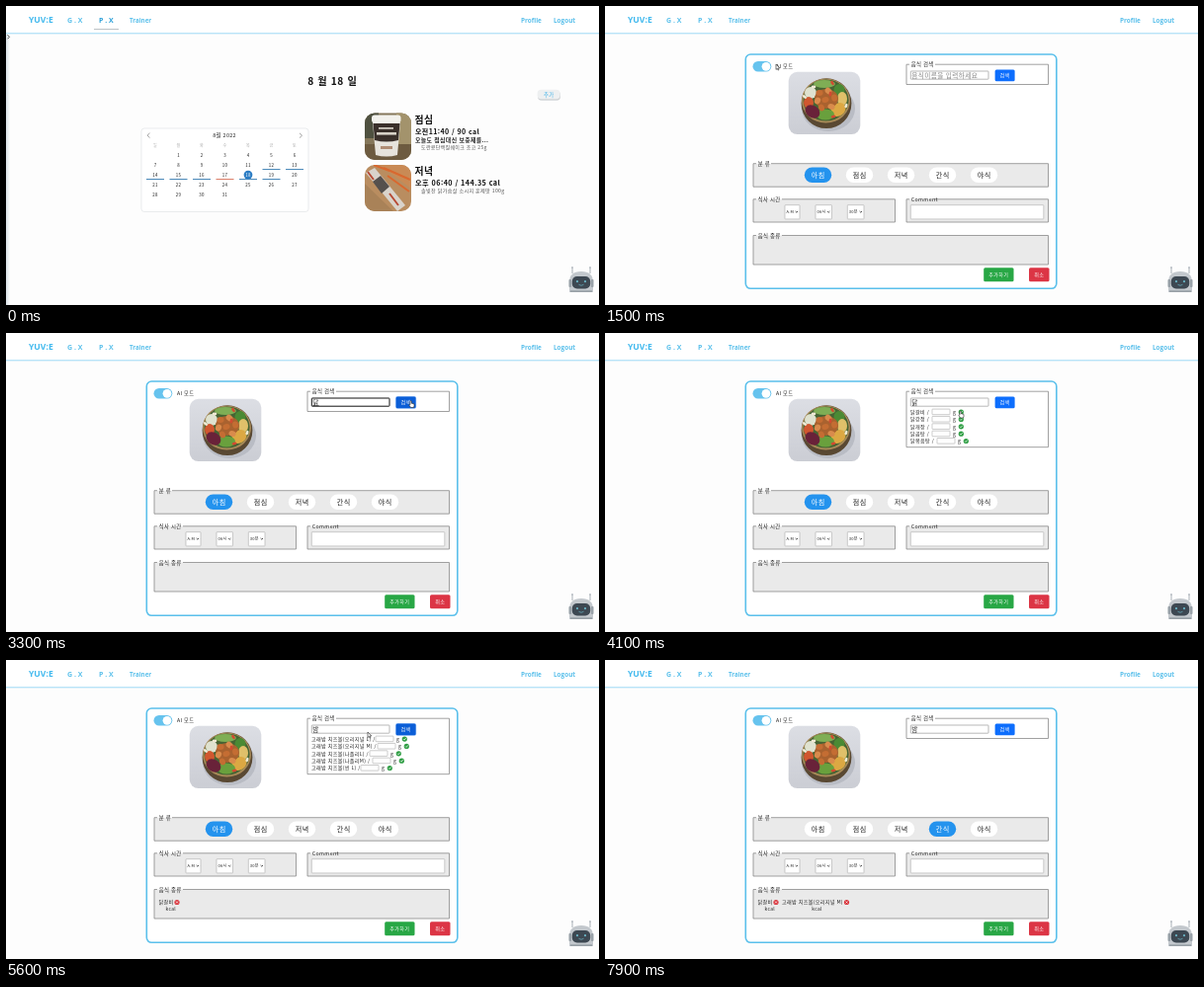
These frames come from a looping animation (600 px wide and 303 px high, 8000 ms). An HTML page:

```html
<!DOCTYPE html>
<html lang="ko">
<head>
<meta charset="utf-8">
<style>
html, body { margin: 0; height: 100%; overflow: hidden; background: #fdfdfd; }
svg { display: block; width: 100vw; height: 100vh; }
text { font-family: "Noto Sans CJK KR", "Noto Sans CJK JP", "Noto Sans CJK", sans-serif; letter-spacing: .06em; white-space: pre; }
.nav { font-family: "Open Sans", sans-serif; font-weight: 700; letter-spacing: 0; }
</style>
</head>
<body>
<svg id="stage" viewBox="0 0 600 303"></svg>
<script>
const LOOP = 8000, STEP = 100;
const SKY = '#5bc0eb', INK = '#222';

const text = (x, y, size, s, fill = INK, extra = '') =>
  `<text x="${x}" y="${y}" font-size="${size}" fill="${fill}" ${extra}>${s}</text>`;
const mid = (x, y, size, s, fill, extra = '') => text(x, y, size, s, fill, `text-anchor="middle" ${extra}`);
const rect = (x, y, w, h, fill, r = 0, extra = '') =>
  `<rect x="${x}" y="${y}" width="${w}" height="${h}" rx="${r}" fill="${fill}" ${extra}/>`;
const circle = (x, y, r, fill) => `<circle cx="${x}" cy="${y}" r="${r}" fill="${fill}"/>`;
const oval = (x, y, rx, ry, fill, turn = 0) =>
  `<ellipse cx="${x}" cy="${y}" rx="${rx}" ry="${ry}" fill="${fill}" transform="rotate(${turn} ${x} ${y})"/>`;
const line = (d, stroke, width = 0.7, extra = '') =>
  `<path d="${d}" fill="none" stroke="${stroke}" stroke-width="${width}" ${extra}/>`;
const border = (color, width = 0.6) => `stroke="${color}" stroke-width="${width}"`;
const BOLD = 'font-weight="700"', MEDIUM = 'font-weight="500"';

// Fieldset whose top border is broken by its legend
const fieldset = (x, y, r, b, legend, gap, fill) =>
  `<path d="M${x + 4 + gap} ${y}H${r}V${b}H${x}V${y}H${x + 3}" fill="${fill}" ${border('#8a8a8a', 0.8)}/>` +
  text(x + 4.7, y + 2, 5.4, legend);

const button = (x, y, w, h, label, fill) =>
  rect(x, y, w, h, fill, 1.5) + mid(x + w / 2, y + h / 2 + 1.9, 5.1, label, '#fff', MEDIUM);

const defs = `<defs>
  <linearGradient id="edge"><stop stop-color="#d9e2e8"/><stop offset="1" stop-color="#fdfdfd"/></linearGradient>
  <linearGradient id="below" x2="0" y2="1"><stop stop-color="#a5dcf6"/><stop offset="1" stop-color="#fdfdfd"/></linearGradient>
  <linearGradient id="table" x2="0" y2="1"><stop stop-color="#dcdee4"/><stop offset="1" stop-color="#cbcdd4"/></linearGradient>
  <clipPath id="shake">${rect(363, 108.5, 47, 47.5, '#000', 10)}</clipPath>
  <clipPath id="snack">${rect(363, 161, 47, 47, '#000', 10)}</clipPath>
</defs>`;

function header(active) {
  const link = (x, s, fill = SKY, size = 6.4) => text(x, 17, size, s, fill, 'class="nav"');
  return rect(0, 0, 600, 27, '#fff') + rect(0, 27, 600, 2.2, 'url(#below)') +
    link(23, 'YUV:E', '#41b9ee', 8.6) + link(62, 'G . X', SKY, 7) +
    link(94, 'P . X', active ? '#2a9fd8' : SKY, 7) + link(125, 'Trainer', SKY, 6.2) +
    link(521, 'Profile') + link(554, 'Logout') +
    (active ? rect(89, 23, 25, 0.9, '#b5bcc0') : '');
}

const robot =
  line('M573 271V265M591 271V265', '#a9b0b6', 1) + circle(573, 265, 0.9, '#b3bac0') + circle(591, 265, 0.9, '#b3bac0') +
  '<path d="M570 290V280Q570 269 582 269T594 280V290Z" fill="#c3c8cd"/>' +
  rect(569.5, 277, 2.6, 8, '#98a1a8', 1) + rect(591.9, 277, 2.6, 8, '#98a1a8', 1) +
  rect(572.8, 274, 18.4, 12.4, '#3d4852', 5) +
  circle(578, 279.2, 1.1, '#69b3c4') + circle(586, 279.2, 1.1, '#69b3c4') +
  line('M579.5 282.3Q582 284.2 584.5 282.3', '#69b3c4', 0.7) + rect(571, 288.4, 22, 1.4, '#8f989f');

function calendar() {
  const colX = c => 151 + 23.5 * c, rowY = r => 152.6 + 10 * r;
  let s = rect(137, 124, 169, 84.5, '#fff', 3, border('#dcdfe2')) +
    mid(221, 133.3, 5.4, '8월 2022', INK, MEDIUM) +
    line('M145.5 128.8L143 131.2L145.5 133.6M297 128.8L299.5 131.2L297 133.6', '#777');
  [...'일월화수목금토'].forEach((d, c) => s += mid(colX(c), 142.6, 4, d, '#aaa'));
  for (let day = 1; day <= 31; day++) {
    const col = day % 7, x = colX(col), y = rowY(Math.floor(day / 7));
    if (day >= 12 && day <= 19) s += rect(x - 9, y + 2.5, 18, 1, day === 17 ? '#d9765f' : '#3d80b4');
    if (day === 18) s += circle(x, y - 1.5, 4.4, '#2a7cc4');
    s += mid(x, y, 4.4, day, day === 18 ? '#fff' : INK, MEDIUM);
  }
  return s;
}

const shakePhoto = `<g clip-path="url(#shake)">` + rect(363, 108, 47, 48, '#85775a') +
  rect(363, 108, 14, 26, '#4f5140') + rect(395, 108, 15, 48, '#a3936c') + rect(363, 140, 47, 16, '#6d5b40') +
  '<path d="M371 118H399L396 151Q385 154 374 151Z" fill="#e6e3dc"/>' +
  '<path d="M371.5 119H398.5L397 136Q385 139 373 136Z" fill="#3a302b"/>' +
  rect(370, 110.5, 29.5, 8, '#f2f1ec', 3) +
  rect(377, 123, 15, 1.8, '#cfc9bf') + rect(375, 128, 20, 2.6, '#d8d2c8') + rect(379, 142, 12, 3, '#b08d75') + '</g>';

const snackPhoto = `<g clip-path="url(#snack)">` + rect(363, 161, 47, 47, '#b98d60') +
  '<path d="M378 161H410V185Z" fill="#c98a55"/><path d="M363 180L392 208H363Z" fill="#a98258"/>' +
  line('M382 164L409 176M386 172L408 188M372 161L388 167', '#d9682f', 2) +
  '<path d="M364 169L373 164L404 202L396 208Z" fill="#d9d3cb"/>' +
  '<path d="M371 178L379 172L388 183L380 190Z" fill="#55504d"/>' +
  line('M366 168L372 176M388 190L397 202', '#b84b35', 2) + '</g>';

const listPage = rect(0, 29, 4, 274, 'url(#edge)') + line('M1.5 29.3L3.5 31.3L1.5 33.3', '#333', 0.9) +
  mid(330.3, 80.2, 10.2, '8 월 18 일', '#111', BOLD) +
  rect(538, 86.2, 23, 9.6, '#d0d4d6', 4) + rect(537.6, 84.7, 23, 9.6, '#eef0f1', 4) +
  mid(549.2, 91.7, 5.4, '추가', '#45b4e8', MEDIUM) +
  calendar() + shakePhoto + snackPhoto +
  text(413.5, 119.2, 9.8, '점심', '#111', BOLD) +
  text(414, 130.2, 7, '오전11:40 / 90 cal', '#111', BOLD) +
  text(414, 138.4, 5.9, '오늘도 점심대신 보충제를...', INK, BOLD) +
  text(420, 145.2, 5, '도란콩단백질쉐이크 초코 25g', '#555') +
  text(413.5, 171.2, 9.8, '저녁', '#111', BOLD) +
  text(414, 182.2, 7.2, '오후 06:40 / 144.35 cal', '#111', BOLD) +
  text(420, 189.2, 5.1, '솔빛찬 닭가슴살 소시지 훈제맛 100g', '#555');

const bowlPhoto = rect(185.7, 66.8, 72.6, 63.3, 'url(#table)', 9) +
  oval(226, 104, 27, 23, '#b9bcc4') + circle(224, 98.7, 25.4, '#594832') +
  oval(223.5, 96, 24.5, 22.5, '#a88a58') + oval(223.5, 95.5, 23, 21, '#466434') +
  oval(208, 88, 6, 6, '#dfe2cf') + oval(222, 79, 11, 4, '#7fae55') + oval(206, 98, 5, 6, '#d0572f') +
  oval(237, 85, 5.5, 6, '#4b8a34') + oval(240, 94, 5, 7, '#e0c06a') + oval(236, 105, 8, 6.5, '#dca843', -35) +
  oval(223, 110, 9, 5.5, '#69a03d') + oval(210, 107, 8, 6, '#692239', 35) + oval(224, 94, 12, 10, '#a9622f') +
  [[217, 88], [226, 86], [232, 93], [215, 96], [223, 95], [229, 102], [219, 103]]
    .map(([x, y], i) => oval(x, y, 3.6, 2.9, i % 2 ? '#d98b4c' : '#c46d33', 40 * i)).join('') +
  [[211, 82], [230, 78], [244, 101], [231, 112], [202, 92], [228, 89]]
    .map(([x, y], i) => oval(x, y, 2.4, 1.4, i % 2 ? '#d24a31' : '#f0ead4', 55 * i)).join('');

const select = (x, w, label) => rect(x, 201.7, w, 14.2, '#fff', 0.5, border('#aaa')) +
  text(x + 1.4, 210.2, 4.1, label) + line(`M${x + w - 4.4} 208l1.2 1.2l1.2 -1.2`, INK, 0.8);

const formBase = rect(142.3, 49, 314.5, 237.3, '#fff', 5, border(SKY, 1.6)) +
  rect(149.5, 56, 18.8, 10.6, '#66c3ee', 5.3) + circle(163, 61.3, 4.4, '#fff') +
  text(173, 62.9, 5.2, 'AI 모드') + bowlPhoto +
  fieldset(150, 159.7, 448.5, 183.2, '분 류', 14, '#eaeaea') +
  fieldset(150, 195.8, 293.5, 219, '식사 시간', 25, '#eaeaea') +
  select(182, 15, 'A.M') + select(213, 16.5, '06시') + select(245.3, 16.7, '30분') +
  fieldset(305, 195.8, 448.5, 219, 'Comment', 24, '#eaeaea') +
  rect(309.3, 201.7, 134.5, 14.2, '#fff', 0.5, border('#aaa')) +
  fieldset(150, 232.5, 448.5, 262, '음식 종류', 25, '#eaeaea') +
  button(383.2, 265.2, 30.3, 14, '추가하기', '#28a745') + button(429, 265.2, 20.5, 14, '취소', '#dc3545');

// Result rows: label and x of its gram box
const CHICKEN = [['닭갈비', 331], ['닭강정', 331], ['닭개장', 331], ['닭곰탕', 331], ['닭볶음탕', 336]];
const CHESTNUT = [['오리지널 L', 374], ['오리지널 M', 376], ['나폴리L', 368], ['나폴리M', 371], ['씬 L', 359]]
  .map(([kind, x]) => [`고래밤 치즈볼(${kind})`, x]);

const resultRow = ([label, x], i) => {
  const y = 81.8 + 7.35 * i;
  return text(309, y, 5.1, label + ' /') + rect(x, y - 4.7, 18, 5.6, '#fff', 0.5, border('#999', 0.5)) +
    text(x + 21, y, 5.1, 'g') + circle(x + 29.3, y - 1.7, 2.6, '#2f9e44') +
    line(`M${x + 28} ${y - 1.7}l1 1l1.7 -2`, '#fff');
};

const tag = (x, label, dotX, kcalX) => text(x, 247, 5.1, label) + circle(dotX, 245.5, 2.6, '#d9363e') +
  line(`M${dotX - 1} 244.5l2 2m0 -2l-2 2`, '#fff') + mid(kcalX, 253.6, 4.9, 'kcal');

const within = (t, a, b) => t >= a && t < b;
// Latest value whose start time has passed
const latest = (t, keys) => keys.filter(k => k[0] <= t).pop()[1];

const TYPED = [[0, ''], [2500, 'ㄷ'], [2600, '다'], [2700, '달'], [2900, '닭'], [5000, 'ㅂ'], [5100, '바'], [5200, '밤']];

function search(t) {
  const rows = within(t, 3500, 4300) ? CHICKEN : within(t, 5500, 6400) ? CHESTNUT : [];
  const focus = within(t, 2200, 3500) || within(t, 4400, 5400);
  const hot = within(t, 3100, 3700) || within(t, 5300, 5700);
  const typed = latest(t, TYPED), picked = within(t, 4600, 5000);
  const composing = within(t, 2500, 3500) || within(t, 5000, 5400);
  return fieldset(305, 59.2, 448.5, rows.length ? 115.7 : 79.5, '음식 검색', 25, '#fff') +
    rect(309.3, 66, 78.7, 8.2, '#fff', 0.6, focus ? border('#111', 1) : border('#888')) +
    (picked ? rect(310.2, 66.7, 6.8, 6.9, '#2f77d0') : '') +
    text(310.3, 72.5, 6.6, typed || '음식이름을 입력하세요', picked ? '#fff' : typed ? INK : '#858585') +
    (composing ? rect(310.3, 73, 6.4, 0.5, INK) : '') +
    (hot ? rect(394, 64, 21.2, 12.8, '#a9cbfb', 2) : '') +
    button(394.6, 64.6, 20, 11.6, '검색', hot ? '#0b5ed7' : '#0d6efd') + rows.map(resultRow).join('');
}

function form(t) {
  const active = t < 7400 ? 0 : 3;
  const pills = ['아침', '점심', '저녁', '간식', '야식'].map((s, i) => {
    const on = i === active, x = 215.5 + 42 * i;
    return rect(x - 13.7, 163.6, 27.4, 15.4, on ? '#2493ee' : '#fff', 7.7) +
      mid(x + 0.2, 174, 7.1, s, on ? '#fff' : INK, MEDIUM);
  }).join('');
  return formBase + search(t) + pills +
    (t >= 4300 ? tag(154.5, '닭갈비', 173, 166.7) : '') +
    (t >= 6400 ? tag(179, '고래밤 치즈볼(오리지널 M)', 244.5, 214.5) : '');
}

// Pointer path: time, x, y
const PATH = [[100, 500, 80], [300, 548, 91], [600, 548, 91], [1300, 173, 59], [1600, 173, 59], [2100, 335, 69],
  [2700, 335, 69], [3200, 409, 68.5], [3600, 409, 68.5], [4000, 359, 79], [4300, 359, 79], [4450, 320, 70],
  [4650, 309, 70], [4900, 276, 81], [5000, 276, 81], [5300, 402, 70], [5400, 402, 70], [5600, 366, 73],
  [6000, 405, 86], [6400, 405, 86], [6800, 328, 102.5], [7200, 343, 171], [7700, 343, 171]];
const HANDS = [[300, 600], [3100, 3700], [4000, 4300], [5300, 5500], [6000, 6500], [7200, 7700]];
const ARROW = 'M0 0V5.4L1.3 4.3L2.1 6.1L2.9 5.7L2.1 4H3.8Z';
const HAND = 'M0 .5Q.7 -.3 1.3 .5V2.7L3.9 3.3Q4.4 5.3 3.5 7H.6L-1.2 4.4Q-.7 3.5 0 4.2Z';

function pointer(t) {
  const i = PATH.findIndex(k => k[0] > t);
  if (i < 1) return '';
  const [t0, x0, y0] = PATH[i - 1], [t1, x1, y1] = PATH[i];
  const p = (t - t0) / (t1 - t0), e = p * p * (3 - 2 * p);
  const hand = HANDS.some(([a, b]) => within(t, a, b));
  return `<path d="${hand ? HAND : ARROW}" transform="translate(${x0 + (x1 - x0) * e} ${y0 + (y1 - y0) * e})"
    fill="#fff" ${border('#222', 0.6)}/>`;
}

const stage = document.getElementById('stage');
let shown = -1;

function draw(now) {
  const t = Math.floor(now % LOOP / STEP) * STEP;
  if (t !== shown) {
    shown = t;
    const list = t < 500;
    stage.innerHTML = defs + rect(0, 0, 600, 303, '#fdfdfd') + header(list) +
      (list ? listPage : form(t)) + robot + pointer(t);
  }
  requestAnimationFrame(draw);
}
draw(0);
</script>
</body>
</html>
```
